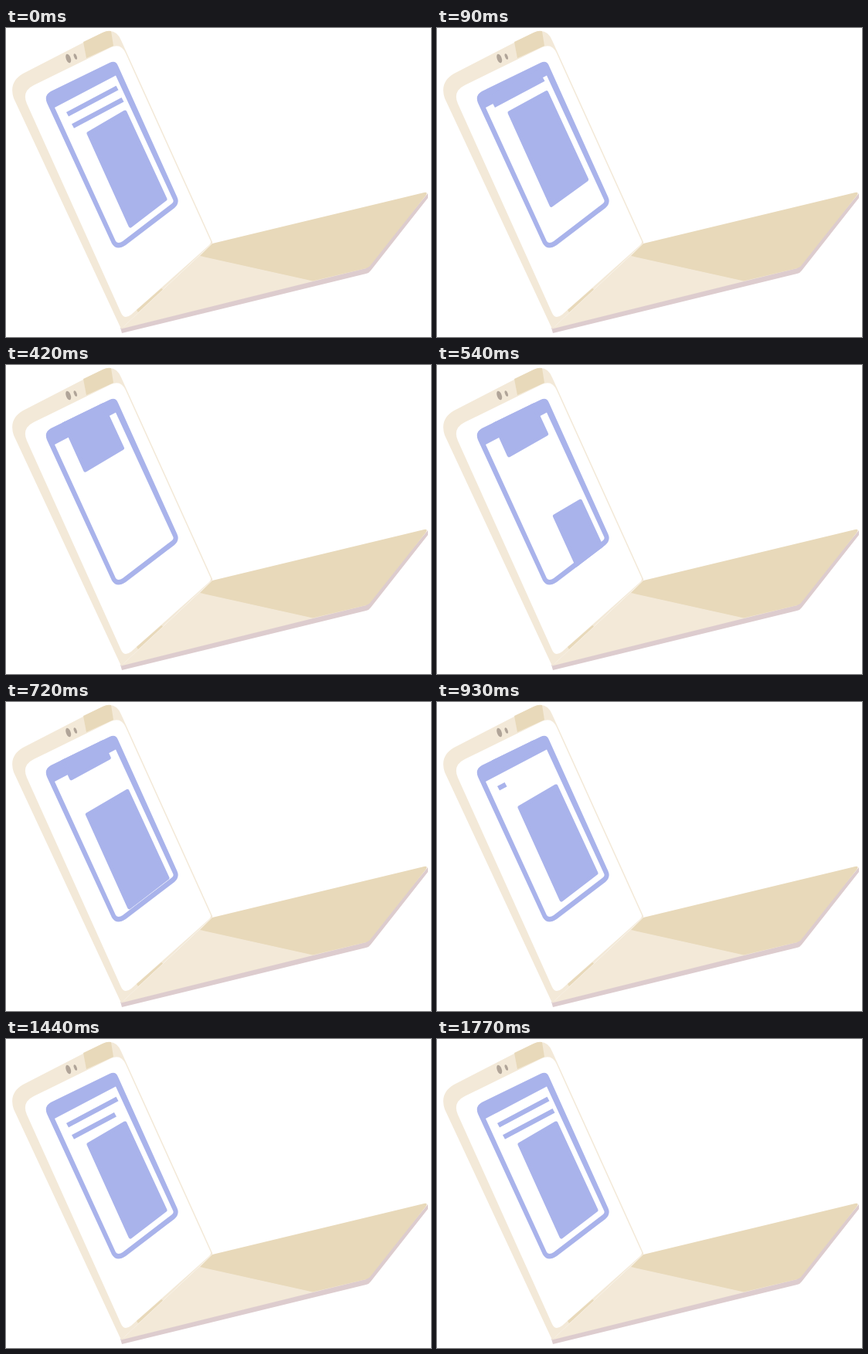
These frames come from a looping animation (550x400 px, 1.8 s). An HTML page:

```html
<!DOCTYPE html>
<html lang="en">
<head>
<meta charset="utf-8">
<title>Scrolling screen</title>
<style>
  html, body { margin: 0; width: 100%; height: 100%; overflow: hidden; background: #fff; }
  svg { display: block; width: 550px; height: 400px; }
  .cream { fill: #f3e9d8; }
  .tan { fill: #e8d9ba; }
  .edge { fill: #ddccce; }
  .lens { fill: #b0a498; }
  .white { fill: #fff; }
  .blue { fill: #a9b3eb; }
  .block { fill: #a9b3eb; stroke: #a9b3eb; stroke-width: 5; stroke-linejoin: round; }
</style>
</head>
<body>
<svg viewBox="0 0 550 400">
  <defs>
    <path id="frame" d="M53 97Q49 87 58 82L134 45Q142 41 145 49L221.500 219Q225 227 218 233L155 281Q143 289 137 279Z"/>
    <clipPath id="screen"><use href="#frame"/></clipPath>
  </defs>

  <!-- base -->
  <path class="edge" d="M148 388L466 309L546 214V220L472 314Q470 317 466 318L150 395Z"/>
  <path class="cream" d="M267 279L149 389.500L466 311L400 280Z"/>
  <path class="tan" d="M267 279L541 213Q546 212 544 216L471 308Q469 310 466 311L397 327.500L251 295Z"/>

  <!-- lid -->
  <path class="cream" d="M10 91Q3 70 22 59L125 6Q142 -1 149 16L267.500 278L149 389.500Z"/>
  <path class="tan" d="M100 18L125 6Q131 3 136 4L139 23L104 39Z"/>
  <ellipse class="lens" cx="80.700" cy="39.500" rx="3" ry="6" transform="rotate(-20 80.700 39.500)"/>
  <ellipse class="lens" cx="89.800" cy="37" rx="1.800" ry="4" transform="rotate(-20 89.800 37)"/>
  <path class="white" d="M27 98Q20 82 36 74L136 25Q149 19 155 33L264.500 275Q266 278 263 281L162 371Q153 378 149 369Z"/>
  <path class="tan" d="M169 365L201 337L203 338.500L171 368Z"/>

  <!-- screen -->
  <use class="blue" href="#frame"/>
  <path class="white" d="M63 103L142 61.500L216 222Q217.500 225 215 227L151 276Q145 280 142 276Z"/>
  <g clip-path="url(#screen)">
    <polygon class="blue" id="line1"/>
    <polygon class="blue" id="line2"/>
    <polygon class="block" id="leaving"/>
    <polygon class="block" id="entering"/>
  </g>
</svg>
<script>
  const LOOP = 1800, STEP = 30;
  const TL = [107, 136.5], TR = [154, 109], BR = [206, 221.5], BL = [161, 256];
  const LINES = [[78, 109], [85, 124.2]];
  const byId = id => document.getElementById(id);
  const shapes = { line1: byId('line1'), line2: byId('line2'), leaving: byId('leaving'), entering: byId('entering') };

  const progress = (t, from, to) => Math.min(1, Math.max(0, (t - from) / (to - from)));
  const easeOut = (p, power) => 1 - (1 - p) ** power;
  const easeBack = p => 1 + 2.7 * (p - 1) ** 3 + 1.7 * (p - 1) ** 2;
  const mix = (a, b, k) => a.map((v, i) => v + (b[i] - v) * k);
  const shift = ([x, y], d) => [x - 0.487 * d, y - d];
  const draw = (shape, points) => shape.setAttribute('points', points.join(' '));

  function bar(start, length, scroll) {
    const [x, y] = shift(start, scroll);
    const dx = 64.5 * length, dy = -34.2 * length;
    return length ? [[x, y], [x + dx, y + dy], [x + dx + 3, y + dy + 5.5], [x + 3, y + 5.5]] : [];
  }

  function render(t) {
    const scroll = 168 * easeOut(progress(t, 25, 1185), 3);
    draw(shapes.leaving, t < 1100
      ? [shift(TL, scroll), shift(TR, scroll * 0.95), shift(BR, scroll * 0.95), shift(BL, scroll)]
      : []);

    // the next block slides up along its right edge while widening
    const drop = 1.06 * (1 - progress(t, 450, 800)) ** 2;
    const width = easeBack(progress(t, 450, 900));
    const slide = ([x, y]) => [x + 54 * drop, y + 115 * drop];
    const top = slide(TR), bottom = slide(BR);
    draw(shapes.entering, t > 450
      ? [mix(top, slide(TL), width), top, bottom, mix(bottom, slide(BL), width)]
      : []);

    LINES.forEach((start, i) => {
      const begin = 900 + 300 * i;
      const points = t < 600
        ? bar(start, 1, scroll)
        : bar(start, easeOut(progress(t, begin, begin + 390), 2), 0);
      draw(shapes['line' + (i + 1)], points);
    });
  }

  const origin = performance.now();
  function tick() {
    const t = (performance.now() - origin) % LOOP;
    render(Math.floor(t / STEP) * STEP);
    requestAnimationFrame(tick);
  }
  tick();
</script>
</body>
</html>
```
